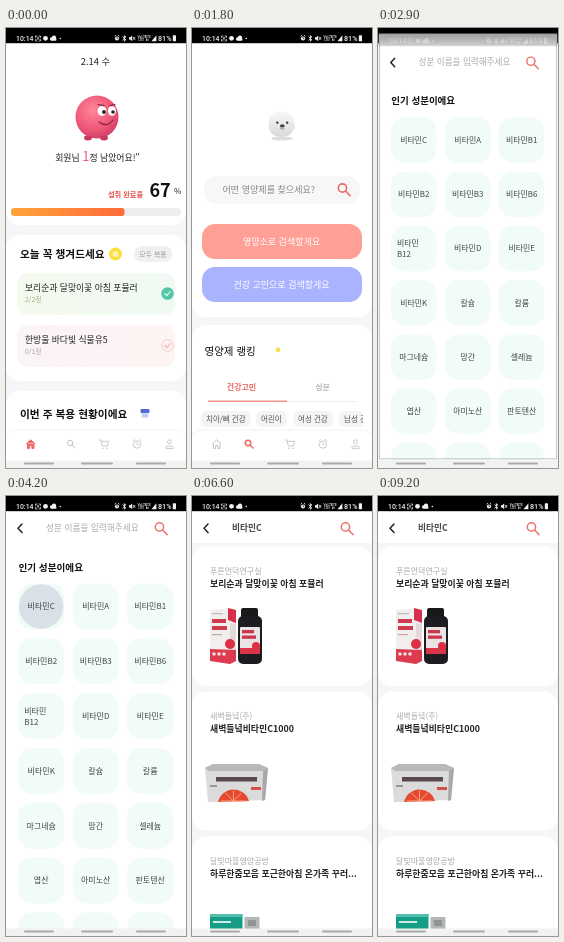
An HTML page that plays this animation: 180 px wide and 440 px high, repeating every 9.3 s.

```html
<!DOCTYPE html>
<html lang="ko">
<head>
<meta charset="utf-8">
<style>
html, body { margin: 0; width: 100%; height: 100%; overflow: hidden; background: #fff; }
svg { display: block; width: 100vw; height: 100vh; }
text { font-family: "Noto Sans CJK KR", "Noto Sans CJK", "Noto Sans", sans-serif; white-space: pre; }
.status text { font-family: Roboto, sans-serif; font-weight: 500; }
</style>
</head>
<body>
<svg id="stage" viewBox="0 0 180 440"></svg>
<script>
const LOOP = 9300;
const RED = '#ed6a64', INK = '#222', GAP = '#f6f6f9';

// Shape helpers; text is placed by its vertical centre.
const rect = (x, y, w, h, fill, r = 0, extra = '') =>
  `<rect x="${x}" y="${y}" width="${w}" height="${h}" rx="${r}" fill="${fill}" ${extra}/>`;
const circle = (x, y, r, fill, extra = '') => `<circle cx="${x}" cy="${y}" r="${r}" fill="${fill}" ${extra}/>`;
const oval = (x, y, rx, ry, fill) => `<ellipse cx="${x}" cy="${y}" rx="${rx}" ry="${ry}" fill="${fill}"/>`;
const line = (d, color, width = 1) =>
  `<path d="${d}" fill="none" stroke="${color}" stroke-width="${width}" stroke-linecap="round" stroke-linejoin="round"/>`;
const shape = (d, fill) => `<path d="${d}" fill="${fill}"/>`;
const text = (x, y, size, str, fill = INK, weight = 400, anchor = 'start') =>
  `<text x="${x}" y="${y + size * 0.37}" font-size="${size}" fill="${fill}" font-weight="${weight}" text-anchor="${anchor}">${str}</text>`;
const group = (id, body, extra = '') => `<g id="${id}" ${extra}>${body}</g>`;

const magnifier = (x, y, s, color, w) =>
  line(`M${x + s * 0.25} ${y + s * 0.25}L${x + s} ${y + s}`, color, w) +
  circle(x - s * 0.25, y - s * 0.25, s * 0.68, 'none', `stroke="${color}" stroke-width="${w}"`);
const check = (x, y, color) => line(`M${x - 2.7} ${y}l2 2.1 3.5-4.1`, color, 1.1);

function statusBar() {
  const w = '#f2f2f2';
  return '<g class="status">' + rect(0, 0, 180, 15.2, '#000') +
    text(10, 10, 6.9, '10:14', w) +
    line('M31 8h-1.5v1.5M29.5 11.5v1.5h1.5M33 8h1.5v1.5M34.5 11.5v1.5H33M31 9.2l2 2.4M33 9.2l-2 2.4', w, 0.7) +
    circle(39.5, 10.3, 2.4, w) +
    circle(45.7, 11, 1.8, w) + circle(48, 9.8, 2.2, w) + rect(45.5, 10.5, 5, 2.3, w, 1.1) +
    circle(54.3, 10.5, 0.8, w) +
    circle(111, 10.5, 2.1, w) + line('M109 8l.8-.6M113 8l-.8-.6', w, 0.9) + line('M111 9.5v1.2h.8', '#000', 0.6) +
    line('M116.8 8.8l3 3-1.4 1.4V7.6l1.4 1.4-3 3', w, 0.9) +
    shape('M123 9.2h1.2l2-1.7v5.8l-2-1.7H123z', w) + line('M127.4 9.3l1.5 2.2M128.9 9.3l-1.5 2.2', w, 0.8) +
    text(131.5, 8.8, 3.3, 'VoLTE', w) + text(132.3, 12, 2.8, 'LTE1', w) +
    text(139.5, 8.8, 3.3, 'LTE', w) + line('M140.5 12.5v-1.5M142 12.5v-1.5', w, 0.8) +
    shape('M145.5 13.2l4.9-5.9v5.9z', w) +
    text(152, 10, 7.2, '81%', w) + rect(166.8, 7.3, 3.2, 6, w, 0.6) + '</g>';
}

const gestureBar = () => rect(0, 432.5, 180, 7.5, '#f2f2f2') +
  rect(18, 434.5, 30, 2, '#aaa', 1) + rect(75, 434.5, 32, 2, '#aaa', 1) + rect(130, 434.5, 30, 2, '#aaa', 1);

function tabBar(active) {
  const c = i => i === active ? RED : '#c4c4c4';
  return rect(-1, 402, 182, 45, '#fff', 10, 'stroke="#ececef" stroke-width=".7"') +
    `<path d="M20.2 416l4.5-4.2 4.5 4.2M21.4 415.6v4.8h2.2v-3h2.2v3h2.2v-4.8" fill="${active ? 'none' : RED}" stroke="${c(0)}" stroke-width="1"/>` +
    (active ? magnifier(57, 416, 4, c(1), 1.5) : magnifier(65, 416, 4, c(1), 1)) +
    line('M93 412h1.8l1.6 6h5l1.3-4.7h-7.3', c(2), 0.9) + circle(97, 420.2, 0.8, c(2)) + circle(101, 420.2, 0.8, c(2)) +
    circle(131, 416.5, 3.7, 'none', `stroke="${c(3)}" stroke-width=".9"`) +
    line('M131 414.5v2.2h1.6M127 413l1.7-1.5M135 413l-1.7-1.5', c(3), 0.8) +
    circle(163.5, 413.8, 1.9, 'none', `stroke="${c(4)}" stroke-width=".9"`) +
    line('M159.8 420v-.8c0-1.6 7.4-1.6 7.4 0v.8z', c(4), 0.9);
}

function home() {
  const item = (y, fill, name, count, color) => rect(11, y, 158, 42, fill, 11) +
    text(19, y + 14.5, 8.8, name) + text(19, y + 26.5, 6.8, count, color);
  const ball = circle(91, 89, 21.5, 'url(#ball)') +
    oval(82, 110, 4, 2.4, '#c93a62') + oval(98, 110, 4, 2.4, '#c93a62') +
    oval(96, 83, 4.4, 5, '#fff') + oval(106, 83, 4, 4.8, '#fff') +
    circle(98, 84, 1.9, '#222') + circle(107, 84, 1.8, '#222') +
    line('M92 76.5l6 1.2M104 77.5l5-1', '#7c2340', 1.2) +
    line('M93 94q8 6 14-2', '#87213f', 1.2);
  return rect(0, 15, 180, 425, GAP) +
    rect(0, 4, 180, 193, '#fff', 14) +
    text(89.5, 34, 9.4, '2.14 수', INK, 500, 'middle') +
    group('ball', ball) +
    text(91.5, 130, 8.9, '회원님 <tspan fill="#ef5b78" font-size="13">1</tspan>정 남았어요!"', INK, 400, 'middle') +
    text(102, 166, 7.2, '섭취 완료율', '#e8514a', 700) +
    text(143.5, 162.5, 18, '67', '#111', 700) + text(168, 163.5, 8, '%', '#222', 500) +
    rect(5, 180, 170, 8, '#eee', 4) + rect(5, 180, 113.5, 8, 'url(#bar)', 3) +
    rect(0, 207, 180, 146, '#fff', 14) +
    text(14, 226, 10.7, '오늘 꼭 챙겨드세요', '#111', 700) +
    circle(109.5, 226, 6.5, '#f9df3f') + circle(109.5, 226, 3, '#fff3a4') +
    rect(128, 218, 38, 16, '#f0f0f2', 8) + text(147, 226, 6.9, '모두 복용', '#999', 400, 'middle') +
    item(245, 'url(#mint)', '보리순과 달맞이꽃 아침 포뮬러', '2/2정', '#a6ad87') +
    circle(161.5, 265.5, 6.3, '#55c5a7') + check(161.5, 265.5, '#e9fff8') +
    item(297, 'url(#rose)', '한방울 바다빛 식물유5', '0/1정', '#b5a3ab') +
    circle(161.5, 317.5, 6, '#fdf0f0', 'stroke="#f3cfcb" stroke-width=".9"') + check(161.5, 317.5, '#f0b5ae') +
    rect(0, 363, 180, 60, '#fff', 14) +
    text(14, 386, 10.7, '이번 주 복용 현황이에요', '#111', 700) +
    rect(134.5, 381, 9, 4, '#5269d6', 1) + rect(135.5, 385, 7, 5, '#dce5fb', 1) +
    line('M137 386v2.5M139 386v2.5M141 386v2.5', '#8a9cea', 0.7) +
    tabBar(0);
}

function search() {
  const chip = (x, w, str) => rect(x, 383, w, 16, '#f4f4f6', 6) + text(x + 5, 391, 7.5, str, '#555');
  const mascot = rect(77, 86, 25, 23, 'url(#puff)', 10.5) +
    circle(79.5, 100, 2.5, '#e6e6e6') + circle(100, 100, 2.5, '#e6e6e6') +
    circle(85.5, 96, 1.1, '#333') + circle(95, 96, 1.1, '#333') +
    oval(90.3, 99, 2.3, 1.5, '#444') + line('M88.5 101.5q1.8 1.3 3.6 0', '#777', 0.7);
  return rect(0, 15, 180, 425, GAP) +
    rect(0, 4, 180, 285, '#fff', 14) +
    oval(90, 110.5, 11, 2, '#dedede') + group('mascot', mascot) +
    rect(12, 148, 156, 28, '#f7f7f7', 13) +
    text(30.5, 162, 9.05, '어떤 영양제를 찾으세요?', '#888') + magnifier(152, 161.5, 6.1, RED, 1.6) +
    rect(10, 196, 160, 35, '#ff9f95', 13) + text(89.5, 213.5, 9, '영양소로 검색할게요', '#fff', 500, 'middle') +
    rect(10, 239, 160, 35, '#a9b3ff', 13) + text(89.5, 256.5, 9, '건강 고민으로 검색할게요', '#fff', 500, 'middle') +
    rect(0, 297, 180, 130, '#fff', 14) +
    text(12.5, 323, 10.5, '영양제 랭킹', '#111', 500) +
    circle(86, 316, 0.7, '#ccc', 'id="spark"') +
    text(49.5, 359.5, 8, '건강고민', RED, 700, 'middle') + text(130.5, 359.5, 8, '성분', '#999', 400, 'middle') +
    rect(16, 373, 149, 0.7, '#e8e8e8') + rect(16, 372.5, 79, 1.5, '#f3938c') +
    group('chipRow', chip(9, 50, '치아/뼈 건강') + chip(64, 31, '어린이') + chip(101, 40, '여성 건강') + chip(147, 40, '남성 건강'), 'clip-path="url(#chips)"') +
    tabBar(1);
}

const searchHeader = (str, color, weight) => line('M16 28l-4 4.3 4 4.3', '#222', 1.5) +
  text(40, 32, 8.7, str, color, weight) + magnifier(155, 32.5, 6.1, '#ea766f', 1.5);

function ingredients() {
  const names = ['비타민C', '비타민A', '비타민B1', '비타민B2', '비타민B3', '비타민B6', '비타민|B12', '비타민D', '비타민E',
    '비타민K', '칼슘', '칼륨', '마그네슘', '망간', '셀레늄', '엽산', '아미노산', '판토텐산', '', '', ''];
  const cells = names.map((name, i) => {
    const x = 12.2 + i % 3 * 54.5, y = 87.5 + Math.floor(i / 3) * 54.8;
    const [first, second] = name.split('|');
    const label = second
      ? text(x + 6, y + 17.5, 8, first, '#444') + text(x + 6, y + 29, 8, second, '#444')
      : text(x + 23, y + 23, 8, first, '#444', 400, 'middle');
    const ripple = i ? '' : circle(x + 23, y + 23, 0, '#d5dce6', 'id="ripple" clip-path="url(#firstCell)"');
    return rect(x, y, 46, 46, '#f1fcf7', 14) + ripple + label;
  }).join('');
  return rect(0, 5, 180, 428, '#fff') + statusBar() +
    searchHeader('성분 이름을 입력해주세요', '#aaa', 400) +
    text(12.5, 71, 9.6, '인기 성분이에요', '#111', 700) + cells;
}

function results() {
  const card = (y, h, maker, name) => rect(0, y, 180, h, '#fff', 14) +
    text(18, y + 24.5, 8, maker, '#aaa') + text(18, y + 37.5, 8.9, name, INK, 700);
  const boxAndBottle = shape('M18 114l20-2 6 2v51l-6 3-20-3z', '#f3eeee') +
    shape('M36 112l8 2v13l-8-3z', '#d8304c') + shape('M38 127l6 1v37l-6 3z', '#e3d9da') +
    rect(20, 117, 11, 1.2, '#bbb') + rect(20, 123, 14, 4, '#cf3c50') + rect(20, 130, 15, 4, '#cf3c50') +
    rect(20, 138, 10, 1.2, '#c5a5a8') + circle(38, 148, 5, '#dc2f45') + shape('M18 153l26 1v11l-6 3-20-3z', '#dc3b50') +
    [22, 27, 32].map(x => circle(x, 158, 1.8, '#f8dcdf')).join('') +
    rect(49, 112, 17, 10, '#19191c', 2) + rect(46, 120, 24, 48, '#1d1c20', 5) +
    rect(48, 131, 20, 27, '#e9e3e4', 1) + rect(50, 134, 12, 3.3, '#c9394d') + rect(50, 139.5, 14, 3.3, '#c9394d') +
    rect(48, 152, 20, 6, '#d93448') + circle(64, 150, 4, '#dc2f45');
  const carton = shape('M13 272l8-4h46l9 4-3 32-57 2z', '#dcdbdb') + shape('M13 272l8-4h46l9 4-4 3H17z', '#b9b8b8') +
    shape('M71 275l5-3-3 32-3 1z', '#a9a7a7') + rect(24, 281, 41, 4.5, '#57494b') +
    shape('M26 306a16 16 0 0 1 31-1z', '#e64a2e') +
    line('M41.5 305v-10M41.5 305l-8-8M41.5 305l8-8M41.5 305H29M41.5 305h13', '#ffab8c', 0.9) +
    rect(59, 291, 10, 3, '#d0504a') + rect(18, 289, 7, 2, '#999');
  const packs = rect(18, 418, 32.5, 15, '#169d88') + rect(18, 418, 32.5, 3, '#55bfae') + rect(21, 425, 18, 2, '#cdebe5') +
    rect(52.5, 421, 15, 12, '#b3b7b7') + rect(56, 424, 8, 6, '#8d9694');
  return rect(0, 5, 180, 428, GAP) + rect(0, 15, 180, 32, '#fff') + statusBar() +
    searchHeader('비타민C', '#444', 700) +
    card(50.5, 139.5, '푸른언덕연구실', '보리순과 달맞이꽃 아침 포뮬러') + boxAndBottle +
    card(195.5, 139, '새벽들녘(주)', '새벽들녘비타민C1000') + carton +
    card(340.5, 120, '달빛마을영양공방', '하루한줌모음 포근한아침 온가족 꾸러...') + packs;
}

const gradient = (id, from, to, extra = '') =>
  `<linearGradient id="${id}" ${extra}><stop stop-color="${from}"/><stop offset="1" stop-color="${to}"/></linearGradient>`;
const shade = id => group(id, rect(0, 3, 180, 13, 'url(#veil)') +
  rect(0.5, 5.5, 179, 427, 'none', 0, 'stroke="#bbb"'));

document.getElementById('stage').innerHTML = `<defs>
  ${gradient('bar', '#ffa43b', '#ff6a38')}${gradient('mint', '#f5f9ee', '#f0faf4')}${gradient('rose', '#faf3f8', '#fef4f3')}
  ${gradient('puff', '#f8f8f8', '#d9d9d9', 'x2="0" y2="1"')}${gradient('veil', '#b0b0b0', '#e6e6e6', 'x2="0" y2="1"')}
  <radialGradient id="ball" cx=".42" cy=".35" r=".7"><stop stop-color="#ff8798"/><stop offset=".6" stop-color="#f0597a"/><stop offset="1" stop-color="#cf3c65"/></radialGradient>
  <clipPath id="chips">${rect(0, 380, 171, 22, '#000')}</clipPath>
  <clipPath id="firstCell">${rect(12.2, 87.5, 46, 46, '#000', 14)}</clipPath></defs>` +
  rect(0, 0, 180, 440, '#fff') + group('home', home()) + group('search', search()) + statusBar() +
  group('ingredients', ingredients() + shade('shadeA')) + group('results', results() + shade('shadeB')) + gestureBar();

const $ = id => document.getElementById(id);
const set = (id, attrs) => { for (const k in attrs) $(id).setAttribute(k, attrs[k]); };
const show = (id, on) => set(id, { display: on ? 'inline' : 'none' });
const clamp = v => Math.min(1, Math.max(0, v));

// A new window fades in while growing to full size.
function openWindow(id, shadeId, t, start) {
  const p = clamp((t - start) / 450), scale = 1 - 0.046 * (1 - p) ** 3;
  show(id, t >= start);
  set(id, { opacity: clamp(p * 3), transform: `translate(90 260) scale(${scale}) translate(-90 -260)` });
  set(shadeId, { opacity: 0.9 * clamp(3 * (1 - p)) });
}

function draw(t) {
  show('home', t < 600);
  show('search', t >= 600 && t < 4800);
  set('ball', { transform: `translate(0 ${-1.5 * Math.sin(t / 1000 * Math.PI)})` });

  const hop = Math.abs(Math.sin(t / 1000 * Math.PI));
  set('mascot', { transform: `translate(90 ${111 - 2 * hop}) scale(${1 + 0.06 * hop} ${1 + 0.14 * hop}) translate(-90 -110)` });
  const glow = clamp((t - 1100) / 700);
  set('spark', { r: 0.7 + 1.7 * glow, cy: 316 + 6 * glow, fill: glow > 0 ? '#f3df55' : '#ccc' });

  const press = clamp((t - 4050) / 170);
  set('ripple', { r: press ? 8 + 16 * press : 0, opacity: 0.85 });
  openWindow('ingredients', 'shadeA', t, 2720);
  openWindow('results', 'shadeB', t, 4350);
}

const begin = performance.now();
function tick() {
  draw((performance.now() - begin) % LOOP);
  requestAnimationFrame(tick);
}
tick();
</script>
</body>
</html>
```
